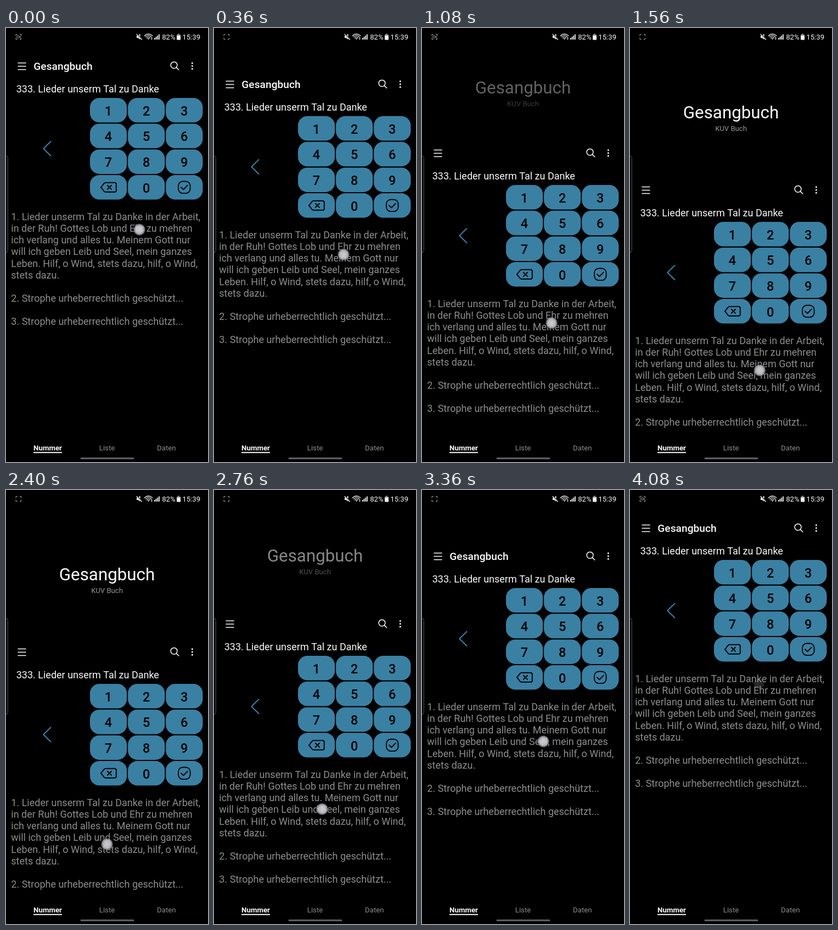
An HTML page with a canvas for the animation above (4.2 s loop, 368 by 788 pixels).

```html
<!DOCTYPE html>
<html lang="de">
<head>
<meta charset="utf-8">
<title>Gesangbuch</title>
<style>
  html, body { margin: 0; width: 100%; height: 100%; overflow: hidden; background: #000; }
  canvas { display: block; }
</style>
</head>
<body>
<canvas id="stage" width="368" height="788"></canvas>
<script>
const ctx = document.getElementById('stage').getContext('2d');
const LOOP = 4200, STEP = 120, MAX_SCROLL = 225, LIST_BOTTOM = 736;
const BLUE = '#3a80a3', GREY = '#8d8d8d', WHITE = '#fafafa';

const SONG = 'Lieder unserm Tal zu Danke';
const VERSES = [
  `1. ${SONG} in der Arbeit,`,
  'in der Ruh! Gottes Lob und Ehr zu mehren',
  'ich verlang und alles tu. Meinem Gott nur',
  'will ich geben Leib und Seel, mein ganzes',
  'Leben. Hilf, o Wind, stets dazu, hilf, o Wind,',
  'stets dazu.',
  '',
  '2. Strophe urheberrechtlich geschützt...',
  '',
  '3. Strophe urheberrechtlich geschützt...'
];

// Two drags: path points are [ms, x, y]; grip is the finger height at scroll 0.
const DRAGS = [
  { grip: 378, fade: [1800, 2160], path: [[0, 243, 366], [240, 238, 392], [600, 232, 450],
    [1080, 236, 535.5], [1200, 236, 564], [1440, 236, 610], [1800, 237, 645]] },
  { grip: 405.5, fade: [3840, 4140], path: [[2400, 184, 643], [2520, 187, 627], [2880, 202, 555.5],
    [3000, 206, 532], [3360, 221, 456.5], [3480, 226, 440.5], [3840, 235, 352]] }
];

const clamp = (v, lo, hi) => Math.min(hi, Math.max(lo, v));

function along(path, t) {
  const last = path[path.length - 1];
  if (t >= last[0]) return { x: last[1], y: last[2] };
  const i = path.findIndex(p => p[0] > t);
  const [a, b] = [path[i - 1], path[i]];
  const k = (t - a[0]) / (b[0] - a[0]);
  return { x: a[1] + (b[1] - a[1]) * k, y: a[2] + (b[2] - a[2]) * k };
}

function text(str, x, y, size, color, { weight = 400, align = 'left', alpha = 1 } = {}) {
  if (alpha <= 0) return;
  ctx.font = `${weight} ${size}px Roboto, sans-serif`;
  ctx.textAlign = align;
  ctx.fillStyle = color;
  ctx.globalAlpha = alpha;
  ctx.fillText(str, x, y);
  ctx.globalAlpha = 1;
}

function line(points, color, width, close) {
  ctx.beginPath();
  points.forEach(([x, y]) => ctx.lineTo(x, y));
  if (close) ctx.closePath();
  ctx.strokeStyle = color;
  ctx.lineWidth = width;
  ctx.stroke();
}

function box(x, y, w, h, r, color, width) {
  ctx.beginPath();
  ctx.roundRect(x, y, w, h, r);
  if (width) {
    ctx.strokeStyle = color;
    ctx.lineWidth = width;
    ctx.stroke();
  } else {
    ctx.fillStyle = color;
    ctx.fill();
  }
}

function disc(x, y, r, fill) {
  ctx.beginPath();
  ctx.arc(x, y, r, 0, Math.PI * 2);
  ctx.fillStyle = fill;
  ctx.fill();
}

function arc(x, y, r, from, to, color, width) {
  ctx.beginPath();
  ctx.arc(x, y, r, from, to);
  ctx.strokeStyle = color;
  ctx.lineWidth = width;
  ctx.stroke();
}

function statusBar(t) {
  const grey = '#a8a8a8';
  for (const [x, dx] of [[18, 1], [27.5, -1]])
    for (const [y, dy] of [[11.5, 1], [20.5, -1]])
      line([[x + dx * 2.5, y], [x, y], [x, y + dy * 2.5]], grey, 1);
  const blink = Math.floor((t + 140) / 500) % 2 === 0;
  if (blink) {
    box(19.8, 14.3, 4.6, 3.6, 1, grey, 1);
    line([[26, 14.6], [26, 17.6]], grey, 1);
  }

  ctx.fillStyle = WHITE;
  ctx.beginPath();
  [[238, 14], [240.5, 14], [244.5, 10.5], [244.5, 21], [240.5, 18], [238, 18]]
    .forEach(([x, y]) => ctx.lineTo(x, y));
  ctx.fill();
  line([[238, 11], [248, 21]], '#000', 2.6);
  line([[238, 11.5], [247.5, 21]], WHITE, 1.2);

  [9.5, 6.6, 3.7].forEach(r => arc(259.5, 20.5, r, -Math.PI * .77, -Math.PI * .23, WHITE, 1.3));
  disc(259.5, 19.6, 1.2, WHITE);
  line([[265.5, 17], [265.5, 21]], WHITE, 1.2);
  for (let i = 0; i < 4; i++) box(270 + i * 2.7, 18 - i * 2.2, 1.7, 3 + i * 2.2, 0, WHITE);

  text('82%', 284.2, 20.8, 13.2, WHITE);
  box(313, 10.5, 3, 1.5, 0, '#999');
  box(311, 11.7, 7, 9.8, 1, '#777');
  box(311, 13.4, 7, 8.1, 1, WHITE);
  text('15:39', 321.3, 20.8, 13.2, WHITE);
}

function toolbar(s) {
  const big = clamp((s - 115) / 110, 0, 1);
  const lift = (MAX_SCROLL - s) * 2 / 3;
  text('Gesangbuch', 184, 164 - lift, 31.3, WHITE, { align: 'center', alpha: big });
  text('KUV Buch', 184, 186.7 - lift, 13.1, '#999', { align: 'center', alpha: big });

  const y = 69 + s;
  [-6, 0, 6].forEach(d => line([[22, y + d + .5], [36, y + d + .5]], WHITE, 1.5));
  text('Gesangbuch', 50.3, y + 7, 19.2, WHITE, { weight: 500, alpha: clamp((112 - s) / 56, 0, 1) });
  arc(306, y - 1.7, 5.9, 0, Math.PI * 2, WHITE, 1.5);
  line([[310.3, y + 2.6], [314.7, y + 7]], WHITE, 1.6);
  [-5.3, 0, 5.3].forEach(d => disc(339.3, y + d, 1.5, WHITE));
}

function keypad(s) {
  const keys = ['1', '2', '3', '4', '5', '6', '7', '8', '9', '', '0', ''];
  keys.forEach((key, i) => {
    const x = 153 + (i % 3) * 69.1, y = 127 + Math.floor(i / 3) * 46.7 + s;
    box(x, y, 67.2, 44.5, 17, BLUE);
    text(key, x + 33.5, y + 31.6, 23.5, '#000', { weight: 500, align: 'center' });
  });

  const y = 289.3 + s;
  line([[173, y], [179, y - 7.6], [181, y - 8.5], [199, y - 8.5], [200.8, y - 6.7],
    [200.8, y + 6.7], [199, y + 8.5], [181, y + 8.5], [179, y + 7.6]], '#000', 2, true);
  line([[184.8, y - 3.6], [192, y + 3.6]], '#000', 2);
  line([[184.8, y + 3.6], [192, y - 3.6]], '#000', 2);
  box(314, y - 10.8, 21.6, 21.6, 8, '#000', 1.9);
  line([[319, y], [323.3, y + 4], [330.8, y - 3.7]], '#000', 2);

  line([[81.5, 206 + s], [68.3, 219 + s], [81.5, 232 + s]], BLUE, 2);
}

function tabs() {
  text('Nummer', 76, 766.6, 13.3, WHITE, { weight: 700, align: 'center' });
  text('Liste', 184, 766.6, 13.2, GREY, { align: 'center' });
  text('Daten', 292.3, 766.6, 13.2, GREY, { align: 'center' });
  box(50, 769.8, 52, 2, 0, WHITE);
  box(135.5, 779.7, 98, 3.3, 1.6, '#5c5c5c');
}

function touchDot(x, y, alpha) {
  const glow = ctx.createRadialGradient(x, y, 0, x, y, 12);
  glow.addColorStop(0, 'rgba(218,216,222,.94)');
  glow.addColorStop(.55, 'rgba(205,203,210,.9)');
  glow.addColorStop(.78, 'rgba(165,163,172,.78)');
  glow.addColorStop(.86, 'rgba(80,78,88,.6)');
  glow.addColorStop(1, 'rgba(40,38,46,0)');
  ctx.globalAlpha = alpha;
  disc(x, y, 12, glow);
  ctx.globalAlpha = 1;
}

function draw(t) {
  const drag = DRAGS[t < 2400 ? 0 : 1];
  const finger = along(drag.path, t);
  const scroll = Math.round(clamp(finger.y - drag.grip, 0, MAX_SCROLL));
  const [from, to] = drag.fade;

  ctx.fillStyle = '#000';
  ctx.fillRect(0, 0, 368, 788);
  ctx.lineCap = ctx.lineJoin = 'round';

  ctx.save();
  ctx.beginPath();
  ctx.rect(0, 0, 368, LIST_BOTTOM);
  ctx.clip();
  toolbar(scroll);
  text(`333. ${SONG}`, 18.7, 116.5 + scroll, 18, WHITE);
  keypad(scroll);
  VERSES.forEach((row, i) => text(row, 9.3, Math.round(349 + i * 21.15) + scroll, 18, GREY));
  ctx.restore();

  statusBar(t);
  tabs();
  box(-8, 232.5, 11.3, 175, 4, '#5a5a5a', 1);
  touchDot(finger.x, finger.y, clamp((to - t) / (to - from), 0, 1));
}

function tick() {
  const t = performance.now() % LOOP;
  draw(Math.floor(t / STEP) * STEP);
  requestAnimationFrame(tick);
}
tick();
</script>
</body>
</html>
```
